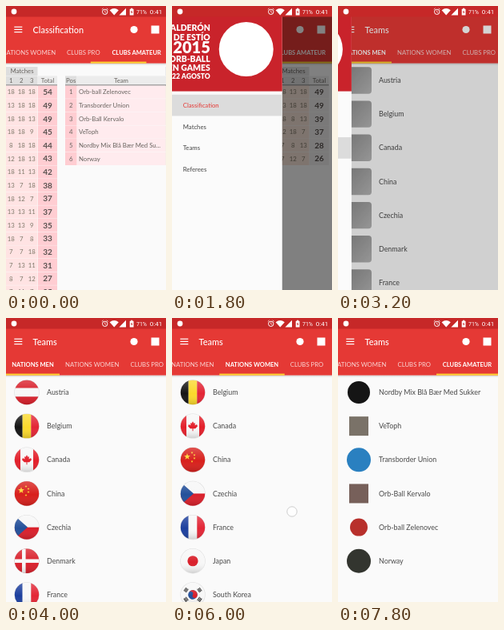
These frames come from a looping animation (200 by 355 pixels, 8 s). An HTML page:

```html
<!DOCTYPE html>
<html lang="en">
<head>
<meta charset="utf-8">
<title>Tournament app</title>
<style>
html, body { margin: 0; width: 100%; height: 100%; overflow: hidden; background: #fafafa; }
svg { display: block; width: 100vw; height: 100vh; }
text { font-family: Lato, "Open Sans", sans-serif; white-space: pre; }
.sys { font-family: Roboto, Inter, sans-serif; }
.medium { font-weight: 500; }
.bold { font-weight: 700; }
.heavy { font-weight: 900; }
.mid { text-anchor: middle; }
.end { text-anchor: end; }
</style>
</head>
<body>
<svg id="stage" viewBox="0 0 200 355" preserveAspectRatio="none">
  <defs>
    <clipPath id="disc"><circle r="15.2"/></clipPath>
    <linearGradient id="gloss" x2="0" y2="1">
      <stop offset="0" stop-color="#fff" stop-opacity=".22"/>
      <stop offset=".55" stop-color="#fff" stop-opacity="0"/>
      <stop offset="1" stop-color="#000" stop-opacity=".16"/>
    </linearGradient>
    <linearGradient id="blank" x2="1" y2="1">
      <stop offset="0" stop-color="#8c8c8c"/>
      <stop offset="1" stop-color="#b4b4b4"/>
    </linearGradient>
    <linearGradient id="shade" x2="0" y2="1">
      <stop offset="0" stop-opacity=".16"/>
      <stop offset="1" stop-opacity="0"/>
    </linearGradient>
  </defs>
</svg>
<script>
const LOOP = 8000, STEP = 200;
const DRAWER_W = 169, ROW_H = 42.15, TABLE_ROW = 16.65;
const RED = '#e53935', DARK_RED = '#c62828';
const stage = document.getElementById('stage');

function el(parent, tag, attrs = {}) {
  const node = document.createElementNS('http://www.w3.org/2000/svg', tag);
  for (const key in attrs) node.setAttribute(key, attrs[key]);
  parent.append(node);
  return node;
}
const group = (parent, x = 0, y = 0) => el(parent, 'g', { transform: `translate(${x} ${y})` });
const rect = (parent, x, y, width, height, fill, more) =>
  el(parent, 'rect', { x, y, width, height, fill, ...more });
const disc = (parent, cx, cy, r, fill, more) => el(parent, 'circle', { cx, cy, r, fill, ...more });
const path = (parent, d, fill, more) => el(parent, 'path', { d, fill, ...more });
function label(parent, x, y, words, size, fill, cls = '') {
  const node = el(parent, 'text', { x, y, fill, 'font-size': size, class: cls });
  node.textContent = words;
  return node;
}
const move = (node, x) => node.setAttribute('transform', `translate(${x} 0)`);
const show = (node, on) => node.setAttribute('visibility', on ? 'visible' : 'hidden');

// Flags, drawn around 0,0
const across = (...colors) => g => colors.forEach((c, i) => rect(g, -16, -16 + i * 10.67, 32, 10.67, c));
const upright = (...colors) => g => colors.forEach((c, i) => rect(g, -16 + i * 10.67, -16, 10.67, 32, c));
function star(g, x, y, r) {
  const points = Array.from({ length: 10 }, (_, i) => {
    const a = i * Math.PI / 5, d = i % 2 ? r * 0.4 : r;
    return `${x + d * Math.sin(a)},${y - d * Math.cos(a)}`;
  });
  el(g, 'polygon', { points: points.join(' '), fill: '#fdd835' });
}
const white = g => rect(g, -16, -16, 32, 32, '#f7f7f7');
const flags = {
  Austria: across('#d9202b', '#f7f7f7', '#d9202b'),
  Belgium: upright('#151515', '#fbd92c', '#e32636'),
  France: upright('#1c3f9e', '#f7f7f7', '#e32636'),
  Canada(g) {
    white(g);
    rect(g, -16, -16, 8, 32, '#e3202b');
    rect(g, 8, -16, 8, 32, '#e3202b');
    path(g, 'M0-6 1.5-3.5 3-4 2.6-.8 5-2.2 6 0 3.2 3 .5 3V6H-.5V3L-3.2 3-6 0-5-2.2-2.6-.8-3-4-1.5-3.5Z', '#e3202b');
  },
  China(g) {
    rect(g, -16, -16, 32, 32, '#d8201c');
    star(g, -7, -4, 4.2);
    for (const [x, y] of [[-1, -9], [2, -6], [2, -2], [-1, 2]]) star(g, x, y, 1.6);
  },
  Czechia(g) {
    white(g);
    rect(g, -16, 0, 32, 16, '#d9202b');
    path(g, 'M-16-15 1 0-16 15Z', '#24509a');
  },
  Denmark(g) {
    rect(g, -16, -16, 32, 32, '#d9202b');
    rect(g, -6, -16, 4.6, 32, '#f7f7f7');
    rect(g, -16, -2.3, 32, 4.6, '#f7f7f7');
  },
  Japan(g) {
    white(g);
    disc(g, 0, 0, 6.6, '#d9202b');
  },
  'South Korea'(g) {
    white(g);
    const yin = el(g, 'g', { transform: 'rotate(25)' });
    disc(yin, 0, 0, 5.8, '#24509a');
    path(yin, 'M-5.8 0A5.8 5.8 0 0 1 5.8 0A2.9 2.9 0 0 1 0 0A2.9 2.9 0 0 0-5.8 0Z', '#d9202b');
    for (const a of [35, 145, 215, 325]) {
      const bars = el(g, 'g', { transform: `rotate(${a})` });
      for (const x of [8.2, 9.8, 11.4]) rect(bars, x, -2.6, 1, 5.2, '#222');
    }
  }
};
function flag(g, name) {
  disc(g, 0, 0, 15.7, '#dcdcdc');
  const face = el(g, 'g', { 'clip-path': 'url(#disc)' });
  flags[name](face);
  disc(face, 0, 0, 15.2, 'url(#gloss)');
}

// Club badges: name, shape, half size, colour
const clubsPro = [
  ['C.F. ZUQ Orb-Ball Crew', 'square', 13, '#3a659f'],
  ['El Zafrán', 'disc', 15, '#0f6a1c'],
  ['La Cuadra V', 'disc', 15, '#1b701f'],
  ['Sylvé-crew', 'disc', 9, '#77726c'],
  ['Orb-Ball Marvol Tesselt', 'disc', 10, '#2a2a2a'],
  ["Rollar's Dulce", 'square', 10, '#8f5a2c'],
  ['Les GriffonBals', 'disc', 13, '#e3b52a']
];
const clubsAmateur = [
  ['Nordby Mix Blå Bær Med Sukker', 'disc', 14, '#151515'],
  ['VeToph', 'square', 12, '#7a7268'],
  ['Transborder Union', 'disc', 15, '#2a80c0'],
  ['Orb-Ball Kervalo', 'square', 12, '#77605a'],
  ['Orb-ball Zelenovec', 'disc', 11, '#b8302c'],
  ['Norway', 'disc', 15, '#33352f']
];
function badge(g, [, shape, r, color]) {
  if (shape === 'disc') disc(g, 0, 0, r, color);
  else rect(g, -r, -r, 2 * r, 2 * r, color);
}

// App bar shared by both screens
const tabs = [['NATIONS MEN', 0, 67], ['NATIONS WOMEN', 67, 148.5], ['CLUBS PRO', 148.5, 204], ['CLUBS AMATEUR', 204, 281]];
const tabScroll = [0, 7.75, 76.25, 81];
const lerp = (a, b, f) => a + (b - a) * f;
function along(list, p) {
  const i = Math.min(Math.floor(p), list.length - 2);
  return lerp(list[i], list[i + 1], p - i);
}
function makeScreen(title) {
  const root = group(stage);
  rect(root, 0, 0, 200, 355, '#fafafa');
  const pager = group(root);
  const pages = tabs.map((_, i) => group(pager, i * 200));
  rect(root, 0, 71.5, 200, 3, 'url(#shade)');
  rect(root, 0, 0, 200, 71.6, RED);
  for (const y of [25.6, 28.8, 32]) rect(root, 10.3, y, 10, 1.2, '#fff');
  label(root, 33.6, 33.7, title, 10.9, '#fff', 'medium');
  disc(root, 160, 29.5, 4.6, '#fff');
  rect(root, 181.5, 24.5, 10, 10, '#fff');
  const strip = group(root);
  const names = tabs.map(([name, a, b]) => label(strip, (a + b) / 2, 61, name, 7.78, '#fff', 'mid'));
  const bar = rect(strip, 0, 69.6, 67, 2, '#fdd835');
  return {
    root, pages,
    place(p) {
      move(pager, -200 * p);
      move(strip, -along(tabScroll, p));
      const left = along(tabs.map(t => t[1]), p), right = along(tabs.map(t => t[2]), p);
      bar.setAttribute('x', left);
      bar.setAttribute('width', right - left);
      names.forEach((n, i) => {
        const on = i === Math.round(p);
        n.setAttribute('class', on ? 'mid bold' : 'mid');
        n.setAttribute('font-size', on ? 7.55 : 7.78);
        n.setAttribute('fill-opacity', on ? 1 : 0.78);
      });
    }
  };
}

// Classification tables
function table(page, rows, scoreFill, totalFill, teams) {
  const ink = '#686460', head = '#dedede';
  rect(page, 131.5, 76, 40, 11, head);
  label(page, 152, 84.4, 'Matches', 7.78, ink, 'mid');
  rect(page, 6, 87.5, 14.5, 11, head);
  rect(page, 21, 87.5, 110, 11, '#ececec');
  rect(page, 131.5, 87.5, 40, 11, head);
  rect(page, 172, 87.5, 24, 11, '#ececec');
  label(page, 13.2, 95.7, 'Pos', 7.78, ink, 'mid');
  label(page, 76, 95.7, 'Team', 7.78, ink, 'mid');
  label(page, 184, 95.7, 'Total', 7.78, ink, 'mid');
  [1, 2, 3].forEach((n, i) => label(page, 138.2 + 13 * i, 95.7, n, 7.78, ink, 'mid'));
  rect(page, 6, 98.5, 190, 1, '#5c5c5c');
  rows.forEach((row, r) => {
    const y = 99.5 + r * TABLE_ROW, base = y + 10.9, h = TABLE_ROW - 0.4;
    rect(page, 6, y, 14.5, h, '#ffcdd2');
    rect(page, 21, y, 110, h, '#ffebee');
    rect(page, 131.5, y, 40, h, scoreFill);
    rect(page, 172, y, 24, h, totalFill);
    label(page, 13.2, base, r + 1, 7.78, ink, 'mid');
    if (teams) label(page, 23, base, teams[r], 7.78, ink);
    row.forEach((n, i) => label(page, 138.2 + 13 * i, base, n, 7.78, '#7d7768', 'mid'));
    label(page, 184, base + 0.8, row.reduce((a, b) => a + b), 10, '#57504e', 'mid bold');
  });
}
const ranks = makeScreen('Classification');
table(ranks.pages[2], [
  [18, 18, 18], [13, 18, 18], [18, 18, 13], [18, 18, 9], [8, 18, 18], [12, 18, 13], [18, 11, 13], [13, 7, 18],
  [18, 12, 7], [13, 13, 11], [13, 13, 9], [18, 7, 8], [7, 7, 18], [7, 13, 11], [8, 7, 12], [7, 11, 7]
], '#ffe3e3', '#ffcdd2');
table(ranks.pages[3],
  [[18, 13, 18], [13, 18, 18], [18, 8, 13], [12, 18, 7], [7, 8, 13], [7, 12, 7]],
  '#f6e2d6', '#efedec',
  ['Orb-ball Zelenovec', 'Transborder Union', 'Orb-Ball Kervalo', 'VeToph', 'Nordby Mix Blå Bær Med Su...', 'Norway']);

// Team lists
const teams = makeScreen('Teams');
const pictures = [], blanks = [];
function list(page, items, nameOf, draw) {
  items.forEach((item, i) => {
    const row = group(page, 26, 93 + i * ROW_H);
    const picture = group(row);
    draw(picture, item);
    pictures.push(picture);
    blanks.push(rect(row, -15, -16.7, 31, 33.4, 'url(#blank)', { rx: 4 }));
    label(row, 25, 3.1, nameOf(item), 8.89, '#4a4a4a');
  });
}
const same = name => name, first = item => item[0];
list(teams.pages[0], ['Austria', 'Belgium', 'Canada', 'China', 'Czechia', 'Denmark', 'France'], same, flag);
list(teams.pages[1], ['Belgium', 'Canada', 'China', 'Czechia', 'France', 'Japan', 'South Korea'], same, flag);
list(teams.pages[2], clubsPro, first, badge);
list(teams.pages[3], clubsAmateur, first, badge);

// Drawer
const scrim = rect(stage, 0, 0, 200, 355, '#000');
const drawer = group(stage);
rect(drawer, 0, 0, DRAWER_W, 355, '#fbfbfb');
rect(drawer, 0, 0, DRAWER_W, 106.6, '#c9232b');
disc(drawer, 124, 54, 34, '#fff');
[['VALDERÓN', 31, 10.4], ['DE ESTÍO', 42.5, 10.4], ['2015', 58.5, 20], ['ORB-BALL', 70, 10.4],
 ['OPEN GAMES', 81, 10.4], ['16-22 AGOSTO', 90.5, 8.6]].forEach(([words, y, size]) =>
  label(drawer, 79, y, words, size, '#fff', 'end heavy'));
const highlight = rect(drawer, 0, 0, DRAWER_W, 26.7, '#dcdcdc');
const entries = ['Classification', 'Matches', 'Teams', 'Referees'].map((words, i) =>
  label(drawer, 45, 127 + i * 26.67, words, 7.78, '#444'));
function choose(n) {
  highlight.setAttribute('y', 110.7 + n * 26.67);
  entries.forEach((e, i) => e.setAttribute('fill', i === n ? RED : '#444'));
}

// Status bar stays above the scrim and the drawer
const status = group(stage);
rect(status, 0, 0, 200, 13.5, DARK_RED);
disc(status, 10, 7, 3.4, '#fff');
disc(status, 123.7, 7.3, 3.2, 'none', { stroke: '#fff', 'stroke-width': 1 });
path(status, 'M123.7 5.4V7.5L125.2 8.5M119.8 4.4 121.6 2.8M127.6 4.4 125.8 2.8', 'none', { stroke: '#fff', 'stroke-width': 0.8 });
path(status, 'M129.6 5.2Q135.2.6 140.8 5.2L135.2 11.6Z', '#fff');
path(status, 'M150 2.8V11.4H141.4Z', '#fff');
path(status, 'M154.7 3.7H156V2.7H158.2V3.7H159.5V11.5H154.7Z', '#fff');
path(status, 'M157.6 5 155.8 7.9H157L156.6 10.2 158.4 7.2H157.2Z', DARK_RED);
label(status, 163, 9.8, '71%', 7, '#fff', 'sys');
label(status, 179.8, 10.1, '0:41', 8, '#fff', 'sys');

const dot = disc(stage, 0, 0, 6.2, '#fff', { 'fill-opacity': 0.75, stroke: '#c8c8c8', 'stroke-width': 0.9 });

// Motion tables: [ms, value]
const rankPage = [[0, 2.66], [200, 2.93], [400, 2.99], [600, 3]];
const teamPage = [
  [4800, 0], [5000, 0.25], [5200, 0.78], [5400, 0.97], [5600, 1],
  [6000, 1], [6200, 1.25], [6400, 1.78], [6600, 1.97], [6800, 2],
  [7000, 2], [7200, 2.25], [7400, 2.78], [7600, 2.97], [7800, 3]
];
const openness = [[1400, 0], [1600, 0.32], [1800, 0.815], [2000, 0.98], [2200, 1], [2800, 1], [3000, 0.55], [3200, 0.1], [3400, 0]];
const dimming = [[1400, 0], [1600, 0.19], [1800, 0.49], [2000, 0.59], [2200, 0.6], [2800, 0.6], [3000, 0.4], [3200, 0.17], [3400, 0]];
const touches = [
  [1200, 15, 30], [2600, 86, 178],
  [4800, 150, 240], [5000, 100, 241],
  [6000, 150, 242], [6200, 100, 243],
  [7000, 150, 247], [7200, 100, 247]
];
function value(track, t) {
  const i = track.findIndex(k => k[0] > t);
  if (i === 0) return track[0][1];
  if (i < 0) return track[track.length - 1][1];
  const [t0, a] = track[i - 1], [t1, b] = track[i];
  return lerp(a, b, (t - t0) / (t1 - t0));
}

function draw(t) {
  const onTeams = t >= 2800;
  ranks.root.style.display = onTeams ? 'none' : '';
  teams.root.style.display = onTeams ? '' : 'none';
  ranks.place(value(rankPage, t));
  teams.place(value(teamPage, t));
  const loaded = t >= 3600;
  pictures.forEach(p => show(p, loaded));
  blanks.forEach(b => show(b, !loaded));
  scrim.setAttribute('opacity', value(dimming, t));
  move(drawer, (value(openness, t) - 1) * DRAWER_W);
  choose(onTeams ? 2 : 0);
  const touch = touches.find(k => k[0] === t);
  show(dot, touch);
  if (touch) {
    dot.setAttribute('cx', touch[1]);
    dot.setAttribute('cy', touch[2]);
  }
}

const start = performance.now();
let last = -1;
function tick() {
  const t = Math.floor(((performance.now() - start) % LOOP) / STEP) * STEP;
  if (t !== last) draw(last = t);
  requestAnimationFrame(tick);
}
tick();
</script>
</body>
</html>
```
